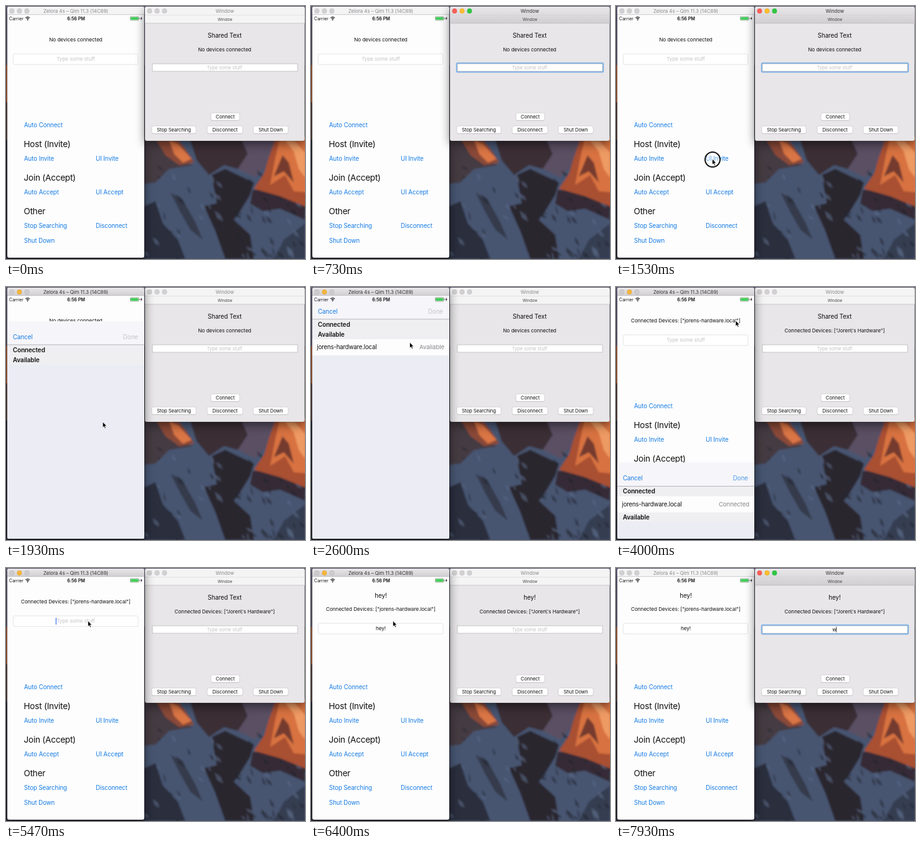
An HTML page for the animation above (8 s loop, 480x407 px).

```html
<!DOCTYPE html>
<html lang="en">
<head>
<meta charset="utf-8">
<title>Shared text demo</title>
<style>
html, body { margin: 0; width: 100%; height: 100%; overflow: hidden; background: #3d475c; }
svg { display: block; width: 100%; height: 100%; }
text { font-family: Inter, Roboto, sans-serif; white-space: pre; }
</style>
</head>
<body>
<svg id="stage" viewBox="0 0 480 407" preserveAspectRatio="none">
  <defs>
    <filter id="soft" x="-30%" y="-30%" width="160%" height="160%"><feGaussianBlur stdDeviation="8"/></filter>
    <filter id="haze"><feGaussianBlur stdDeviation="1.6"/></filter>
    <linearGradient id="bar" x2="0" y2="1"><stop stop-color="#e9e7e9"/><stop offset="1" stop-color="#d0ced0"/></linearGradient>
    <clipPath id="screen"><path d="M2 14H222V403Q222 405 220 405H4Q2 405 2 403Z"/></clipPath>
  </defs>
</svg>
<script>
const LOOP = 8000, STEP = 1000 / 15;
const BLUE = '#147be3', INK = '#111';
const PEER = 'jorens-hardware.local';
const HOST = "Joren\\'s Hardware";
const stage = document.getElementById('stage');

function add(parent, tag, attrs, content) {
  const el = document.createElementNS('http://www.w3.org/2000/svg', tag);
  for (const k in attrs) el.setAttribute(k, attrs[k]);
  if (content) el.textContent = content;
  return parent.appendChild(el);
}
const group = (parent, attrs) => add(parent, 'g', attrs);
const path = (parent, d, fill, more) => add(parent, 'path', { d, fill, ...more });
const rect = (parent, x, y, width, height, fill, more) =>
  add(parent, 'rect', { x, y, width, height, fill, ...more });
// y is the middle of the capitals
const label = (parent, str, x, y, size, fill = INK, more) =>
  add(parent, 'text', { x, y: y + size * 0.36, 'font-size': size, fill, 'letter-spacing': -size * 0.007, ...more }, str);
const centred = (parent, str, x, y, size, fill, more) =>
  label(parent, str, x, y, size, fill, { 'text-anchor': 'middle', ...more });

const show = (el, on) => el.setAttribute('visibility', on ? 'visible' : 'hidden');
const move = (el, x, y) => el.setAttribute('transform', `translate(${x} ${y})`);
const within = (t, a, b) => t >= a && t < b;

function drawWallpaper() {
  const back = group(stage);
  rect(back, 0, 0, 480, 407, '#2b2b37');
  rect(back, 0, 0, 480, 95, '#625f78');
  rect(back, 0, 95, 2, 60, '#b0633f');
  rect(back, 0, 155, 2, 60, '#57423f');

  const g = group(stage, { filter: 'url(#haze)' });
  rect(g, 222, 210, 262, 200, '#475571');
  path(g, 'M296 210H440L424 250 400 276 372 262 330 240Z', '#5a5064');
  path(g, 'M222 210H262L270 246 300 256 262 262 240 284 222 286Z', '#443a43');
  path(g, 'M294 210H376L388 238 372 262 350 256 326 272 306 248Z', '#3b2d34');
  path(g, 'M330 272L352 262 398 284 392 304 376 330 360 352 340 326Z', '#2a252d');
  path(g, 'M318 322L344 316 366 344 392 368 398 407H352L336 362Z', '#29262f');
  path(g, 'M222 322L240 314 252 350 276 376 288 407H222Z', '#2c2f3d');
  path(g, 'M264 300L284 312 304 348 316 376 296 360 280 332Z', '#343a4b');
  path(g, 'M396 296L426 296 480 322V344L440 326 412 330 392 318Z', '#352c34');
  path(g, 'M430 407L446 376 480 350V407Z', '#363e51');

  let seed = 7;
  const rnd = () => (seed = seed * 16807 % 2147483647) / 2147483647;
  for (let i = 0; i < 70; i++) {
    const x = 222 + rnd() * 258, y = 256 + rnd() * 150, w = 3 + rnd() * 7, h = 5 + rnd() * 10;
    path(g, `M${x} ${y}l${w} ${h * 0.5} ${w * 0.4} ${h * 0.7} ${-w} ${-h * 0.4}Z`, i % 3 ? '#252731' : '#5b6a88', { opacity: 0.6 });
  }
  path(g, 'M434 210H484V324L440 306 398 294 414 270 422 244Z', '#a94f33');
  path(g, 'M440 210H484V300L462 298 448 272 424 288 432 246Z', '#d8723f');
  path(g, 'M448 216L462 234 470 262 480 276V236L462 216Z', '#ee9a64');
  path(g, 'M444 240L454 252 462 284 446 266 430 274Z', '#743a2f');
  path(g, 'M238 210H272L288 230 302 252 278 256 256 240Z', '#8a4837');
  path(g, 'M262 216L276 222 298 246 284 252 270 238Z', '#da7444');
}

function drawWindow(x, y, w, h, barH, fill, title, size) {
  const g = group(stage);
  const bottom = y + barH;
  rect(g, x, y + 5, w, h, '#000', { rx: 4, opacity: 0.5, filter: 'url(#soft)' });
  rect(g, x, y, w, h, fill, { rx: 3, stroke: '#00000040', 'stroke-width': 0.6 });
  const bar = path(g, `M${x} ${bottom}V${y + 3}q0-3 3-3H${x + w - 3}q3 0 3 3V${bottom}Z`, '#f5f4f5');
  rect(g, x, bottom - 0.5, w, 0.7, '#b9b7b9');
  const name = centred(g, title, x + w / 2, 8, size);
  const dots = [0, 1, 2].map(i => add(g, 'circle', { cx: x + 7.5 + i * 12, cy: 8, r: 3.9, 'stroke-width': 0.4, stroke: '#00000026' }));
  return {
    g,
    active(on, colours) {
      bar.setAttribute('fill', on ? 'url(#bar)' : '#f5f4f5');
      name.setAttribute('fill', on ? '#333' : '#8a898b');
      dots.forEach((d, i) => d.setAttribute('fill', on ? colours[i] : '#d2d0d2'));
    }
  };
}

function drawPhone() {
  const win = drawWindow(2, 1, 220, 404, 13, '#fdfdfe', 'Zelora 4s – Qim 11.3 (14C89)', 7.9);
  const g = group(win.g, { 'clip-path': 'url(#screen)' });
  const shared = centred(g, 'hey!', 112, 44, 9.8);
  const stack = group(g);
  const devices = centred(stack, '', 112, 54, 8.2);
  rect(stack, 11.5, 77, 200.5, 17, '#fff', { rx: 2.5, stroke: '#dedee0', 'stroke-width': 0.8 });
  const hint = centred(stack, 'Type some stuff', 112, 85.5, 8.2, '#c3c3c8');
  const typed = centred(stack, '', 112, 85.5, 8.2);
  const caret = rect(stack, 0, 80, 1.2, 11, '#3f74e8');

  [['Auto Connect', 29, 192], ['Auto Invite', 29, 246], ['UI Invite', 144, 246],
   ['Auto Accept', 29, 300], ['UI Accept', 144, 300], ['Stop Searching', 29, 354],
   ['Disconnect', 144, 354], ['Shut Down', 29, 378]]
    .forEach(([s, x, y]) => label(g, s, x, y, 9.7, BLUE));
  [['Host (Invite)', 222], ['Join (Accept)', 276], ['Other', 330]]
    .forEach(([s, y]) => label(g, s, 28.5, y, 13.6, INK, { 'letter-spacing': -0.25 }));

  const sheet = drawSheet(g);
  drawStatus(g);
  return { ...win, shared, stack, devices, hint, typed, caret, sheet };
}

function drawStatus(g) {
  label(g, 'Carrier', 5, 20, 7.1);
  centred(g, '6:56 PM', 112.5, 20, 7.2, INK, { 'font-weight': 600 });
  const wifi = { stroke: INK, 'stroke-width': 1.1 };
  path(g, 'M31.3 19.2q3.5-3.2 7 0M32.8 20.8q2-1.8 4 0', 'none', wifi);
  add(g, 'circle', { cx: 34.8, cy: 22.3, r: 0.9, fill: INK });
  rect(g, 199.5, 17, 13.5, 6, 'none', { rx: 1, stroke: '#555', 'stroke-width': 0.5 });
  rect(g, 200.2, 17.7, 12.1, 4.6, '#43cf5a', { rx: 0.5 });
  rect(g, 213.4, 18.8, 0.9, 2.4, '#555');
  path(g, 'M217.8 16.8l-2.2 3.6h1.5l-.7 2.8 2.4-3.8h-1.5Z', INK);
}

function drawSheet(parent) {
  const g = group(parent);
  rect(g, 2, 14, 220, 392, '#ebecf4');
  rect(g, 2, 14, 220, 38, '#f6f5f9');
  const done = label(g, 'Done', 212, 39, 9.8, '#c4c4c8', { 'text-anchor': 'end' });
  label(g, 'Cancel', 11, 39, 9.8, BLUE);
  const header = (str, y) => {
    const h = group(g);
    rect(h, 2, y, 220, 16, '#efeff2');
    label(h, str, 11, y + 8, 9.9, INK, { 'font-weight': 600 });
    return h;
  };
  header('Connected', 52);
  const avail = header('Available', 68);
  rect(g, 2, 51.4, 220, 0.8, '#a9a9ae');
  const row = group(g);
  rect(row, 2, 0, 220, 26, '#fdfdfe');
  label(row, PEER, 9.5, 13, 9.7, INK, { 'letter-spacing': -0.2 });
  const state = label(row, '', 214, 13, 9.6, '#87878c', { 'text-anchor': 'end' });
  return { g, done, avail, row, state };
}

function drawMac() {
  const win = drawWindow(223, 1, 256.5, 216, 27, '#e8e6e8', 'Window', 7.8);
  const g = win.g;
  rect(g, 223, 14.6, 256.5, 0.5, '#cfcdcf');
  centred(g, 'Window', 351.5, 22, 6.2, '#444');
  const title = centred(g, '', 351, 47, 9.8);
  const devices = centred(g, '', 351, 70.5, 8.2);
  const ring = rect(g, 234, 92, 235, 14, 'none', { rx: 1.5, stroke: '#80b3e9', 'stroke-width': 2.4 });
  rect(g, 235, 93, 233, 12, '#fff', { stroke: '#b5b3b5', 'stroke-width': 0.7 });
  const hint = centred(g, 'Type some stuff', 351, 99.5, 7.6, '#c2c2c2');
  const typed = centred(g, 'w', 350.5, 99.5, 7.8);
  const caret = rect(g, 353.4, 94.5, 0.8, 9, '#111');
  [['Connect', 329, 172, 46], ['Stop Searching', 234, 193, 71],
   ['Disconnect', 323, 193, 57], ['Shut Down', 397, 193, 56]]
    .forEach(([s, x, y, w]) => {
      rect(g, x, y + 0.6, w, 12, '#00000030', { rx: 2.6 });
      rect(g, x, y, w, 12, '#fff', { rx: 2.6, stroke: '#c3c1c3', 'stroke-width': 0.6 });
      centred(g, s, x + w / 2, y + 6, 7.7);
    });
  return { ...win, title, devices, ring, hint, typed, caret };
}

function drawPointer() {
  const g = group(stage);
  const halo = add(g, 'circle', { cx: 0.5, cy: 1, r: 12, fill: '#ffffff55', stroke: '#111', 'stroke-width': 2 });
  path(g, 'M0 0V9.2L2.1 7.3 3.6 10.6 5.1 9.9 3.7 6.7H6.5Z', '#000', { stroke: '#fff', 'stroke-width': 0.7 });
  return { g, halo };
}

const route = [
  [700, 330, 420], [1400, 154.5, 246], [1730, 154.5, 246], [2470, 158.5, 89], [2930, 158.5, 89],
  [3530, 200, 39], [3860, 200, 39], [4000, 192, 54], [4600, 131.5, 85], [6470, 131.5, 85], [7060, 350, 99]
];
const clicks = [[1470, 1620], [2730, 2880], [3670, 3820], [5070, 5220], [7120, 7270]];

function pointerAt(t) {
  const i = route.findIndex(k => k[0] > t);
  if (i < 0) return route[route.length - 1].slice(1);
  if (i === 0) return route[0].slice(1);
  const [t0, x0, y0] = route[i - 1], [t1, x1, y1] = route[i];
  const u = (t - t0) / (t1 - t0), e = u * u * (3 - 2 * u);
  return [x0 + (x1 - x0) * e, y0 + (y1 - y0) * e];
}

// critically damped spring, 0 to 1
function spring(ms) {
  const s = Math.max(0, ms) * 0.014;
  return 1 - (1 + s) * Math.exp(-s);
}

drawWallpaper();
const phone = drawPhone(), mac = drawMac(), pointer = drawPointer();
let front = mac;

function raise(win) {
  if (front === win) return;
  stage.insertBefore(win.g, pointer.g);
  front = win;
}

function drawPhoneState(t, linked, sent) {
  phone.active(within(t, 1590, 7190), ['#cdcbcd', '#f6b53c', '#cdcbcd']);
  phone.devices.textContent = linked ? `Connected Devices: ["${PEER}"]` : 'No devices connected';
  show(phone.shared, sent);
  move(phone.stack, 0, sent ? 12 : 0);
  const text = 'hey!'.slice(0, Math.max(0, Math.floor((t - 5600) / 130)));
  phone.typed.textContent = text;
  show(phone.hint, !text);
  show(phone.caret, within(t, 5130, 6200) && (text || (t - 5130) % 1000 < 500));
  phone.caret.setAttribute('x', text ? 112 + text.length * 2.1 : 79.8);

  const { g, done, avail, row, state } = phone.sheet;
  const shown = within(t, 1660, 4600);
  const picked = t >= 2860;
  show(g, shown);
  move(g, 0, 391 * (1 - spring(t - 1660) + spring(t - 3830)));
  done.setAttribute('fill', linked ? (t > 3700 ? '#4b9ae9' : BLUE) : '#c4c4c8');
  move(avail, 0, picked ? 26 : 0);
  move(row, 0, picked ? 68 : 84);
  show(row, shown && t >= 2260);
  state.textContent = linked ? 'Connected' : picked ? 'Connecting' : 'Available';
}

function drawMacState(t, linked, sent) {
  const on = within(t, 200, 1590) || t >= 7190;
  const wrote = t >= 7860;
  mac.active(on, ['#f95f57', '#fbbd2e', '#2fc840']);
  mac.title.textContent = sent ? 'hey!' : 'Shared Text';
  mac.devices.textContent = linked ? `Connected Devices: ["${HOST}"]` : 'No devices connected';
  show(mac.ring, on);
  show(mac.hint, !wrote);
  show(mac.typed, wrote);
  show(mac.caret, on && (wrote || t % 1000 < 500));
}

function render(t) {
  const linked = t >= 3260, sent = t >= 6200;
  raise(within(t, 1590, 7190) ? phone : mac);
  drawPhoneState(t, linked, sent);
  drawMacState(t, linked, sent);
  const [x, y] = pointerAt(t);
  move(pointer.g, x, y);
  show(pointer.g, within(t, 700, 7800));
  show(pointer.halo, clicks.some(([a, b]) => within(t, a, b)));
}

const start = performance.now();
function tick(now) {
  const t = Math.max(0, now - start) % LOOP;
  render(Math.floor((t + 5) / STEP) % 120 * STEP);
  requestAnimationFrame(tick);
}
render(0);
requestAnimationFrame(tick);
</script>
</body>
</html>
```
